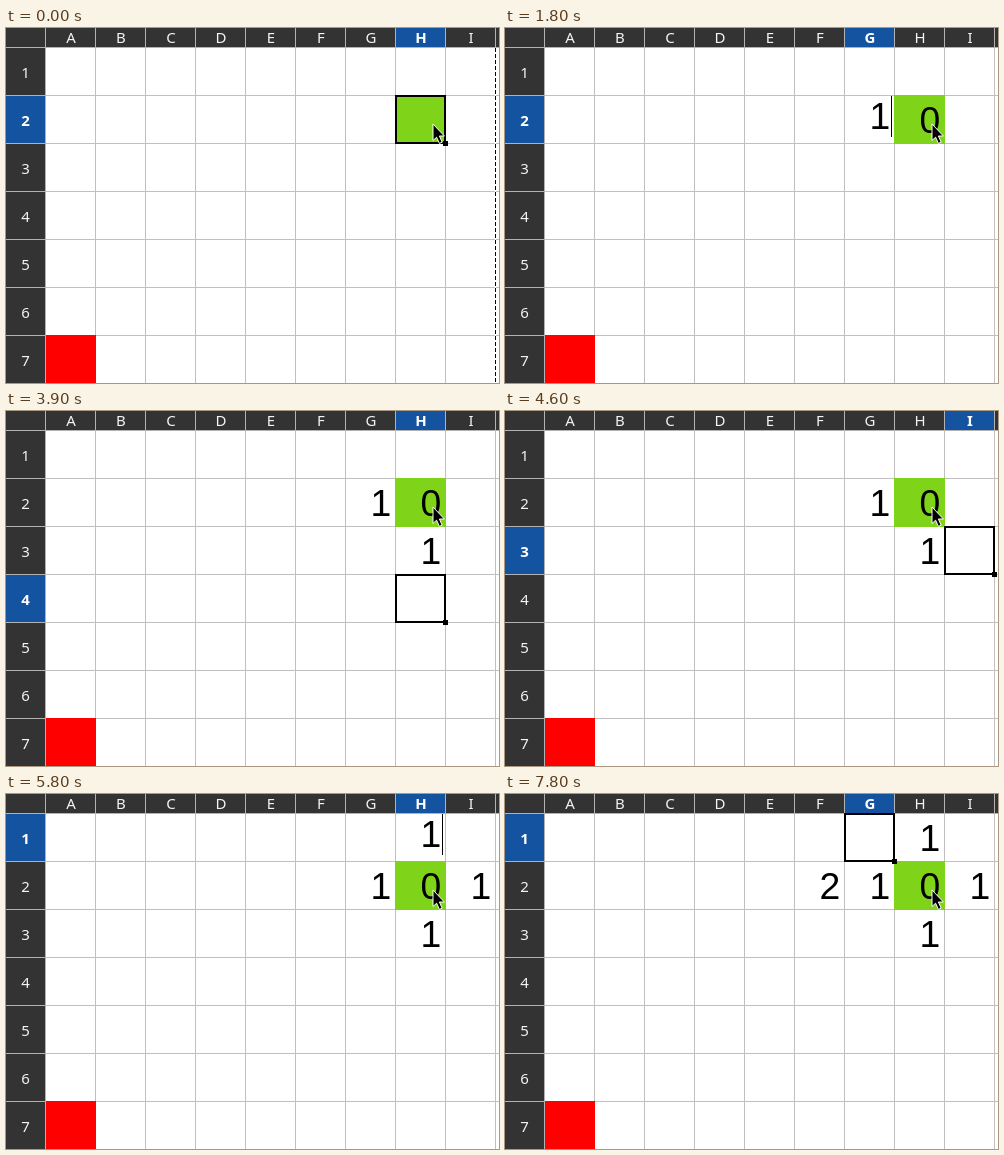
Write an HTML page that moves like this. It is 493 by 355 pixels and loops after 8000 ms.

```html
<!DOCTYPE html>
<html lang="en">
<head>
<meta charset="utf-8">
<title>Spreadsheet entry</title>
<style>
  html, body { margin: 0; width: 100%; height: 100%; overflow: hidden; background: #fff; }
  svg { display: block; width: 493px; height: 355px; }
  .head { font: 15px "Noto Sans", sans-serif; fill: #f4f4f4; text-anchor: middle; }
  .head.on { font-weight: 700; fill: #fff; }
  .value { font: 37.33px "Liberation Sans", Arial, sans-serif; text-anchor: middle; }
</style>
</head>
<body>
<svg id="stage" viewBox="0 0 493 355"></svg>
<script>
const LOOP = 8000, W = 50, H = 48;
const stage = document.getElementById('stage');
const colX = c => 39 + c * W;
const rowY = r => 19 + r * H;

function add(tag, attrs, text) {
  const el = document.createElementNS('http://www.w3.org/2000/svg', tag);
  for (const k in attrs) el.setAttribute(k, attrs[k]);
  if (text !== undefined) el.textContent = text;
  return stage.appendChild(el);
}
const rect = (x, y, width, height, fill) => add('rect', { x, y, width, height, fill });
const show = (el, on) => el.setAttribute('visibility', on ? 'visible' : 'hidden');

// Time, cell and mode: '' selected, 'e' editing, 'b' editing with the caret blinked off
const steps = [
  [0, 'H2', ''], [300, 'H2', 'e'], [800, 'H2', 'b'], [1000, 'G2', ''],
  [1700, 'G2', 'e'], [2000, 'G3', ''], [2400, 'H3', ''], [3000, 'H3', 'e'],
  [3600, 'H3', 'b'], [3900, 'H4', ''], [4400, 'I4', ''], [4600, 'I3', ''],
  [4800, 'I2', ''], [5000, 'I2', 'e'], [5300, 'H2', ''], [5500, 'H1', ''],
  [5800, 'H1', 'e'], [6200, 'G1', ''], [6800, 'G2', ''], [7000, 'F2', ''],
  [7200, 'F2', 'e'], [7600, 'F1', ''], [7800, 'G1', '']
];
const entries = [
  [300, 'H2', 0], [1700, 'G2', 1], [3000, 'H3', 1],
  [5000, 'I2', 1], [5800, 'H1', 1], [7200, 'F2', 2]
];
const place = cell => [cell.charCodeAt(0) - 65, cell[1] - 1];

// Sheet
rect(0, 0, 493, 355, '#fff');
for (let c = 1; c < 10; c++) rect(colX(c), 20, 1, 335, '#c0c0c0');
for (let r = 1; r < 7; r++) rect(40, rowY(r), 453, 1, '#c0c0c0');
rect(389, 67, 51, 49, '#7fd318');
rect(40, 307, 50, 48, '#f00');

const pageBreak = [
  rect(489, 20, 1, 335, '#fff'),
  add('path', { d: 'M489.5 20V355', stroke: '#000', 'stroke-dasharray': '4 2' })
];

// Headers
rect(0, 0, 493, 20, '#333');
rect(0, 0, 40, 355, '#333');
const colMark = rect(0, 0, W, 19, '#1453a0');
const rowMark = rect(0, 0, 39, H, '#1453a0');
for (let c = 0; c < 10; c++) rect(colX(c), 0, 1, 20, '#b2b2b2');
for (let r = 0; r < 7; r++) rect(0, rowY(r), 40, 1, '#b2b2b2');
rect(39, 0, 1, 355, '#b2b2b2');
rect(0, 19, 493, 1, '#b2b2b2');
const label = (x, y, text) => add('text', { x, y, class: 'head' }, text);
const colHeads = [...'ABCDEFGHI'].map((s, c) => label(colX(c) + 26, 15, s));
const rowHeads = [...'1234567'].map((s, r) => label(19.5, rowY(r) + 31, s));

const values = entries.map(([at, cell, n]) => {
  const [c, r] = place(cell);
  return { at, cell, r, el: add('text', { x: colX(c) + 36, class: 'value' }, n) };
});
const caret = rect(0, 0, 1, 41, '#000');
const border = add('rect', { width: 49, height: 47, fill: 'none', stroke: '#000', 'stroke-width': 2 });
const handle = rect(0, 0, 5, 5, '#000');

// Mouse pointer
add('path', {
  d: 'M427 96V112.5L430.6 109.2L433.4 115.4L436.2 114.2L433.4 108H438.4Z',
  fill: '#000', stroke: '#fff', 'stroke-width': 1, 'stroke-linejoin': 'round'
});

function move(el, x, y) {
  el.setAttribute('x', x);
  el.setAttribute('y', y);
}

function draw(t) {
  const [, cell, mode] = steps.filter(s => s[0] <= t).pop();
  const [c, r] = place(cell);
  const x = colX(c), y = rowY(r);

  colHeads.forEach((el, i) => el.classList.toggle('on', i === c));
  rowHeads.forEach((el, i) => el.classList.toggle('on', i === r));
  move(colMark, x + 1, 0);
  move(rowMark, 0, y);
  move(border, x + 1, y + 1);
  move(handle, x + 48, y + 46);
  move(caret, x + 47, y + 1);
  show(border, !mode);
  show(handle, !mode);
  show(caret, mode === 'e');
  pageBreak.forEach(el => show(el, t < 300));

  for (const v of values) {
    show(v.el, t >= v.at);
    v.el.setAttribute('y', rowY(v.r) + (mode && v.cell === cell ? 34 : 38));
  }
}

const start = performance.now();
function tick() {
  draw((performance.now() - start) % LOOP);
  requestAnimationFrame(tick);
}
tick();
</script>
</body>
</html>
```
